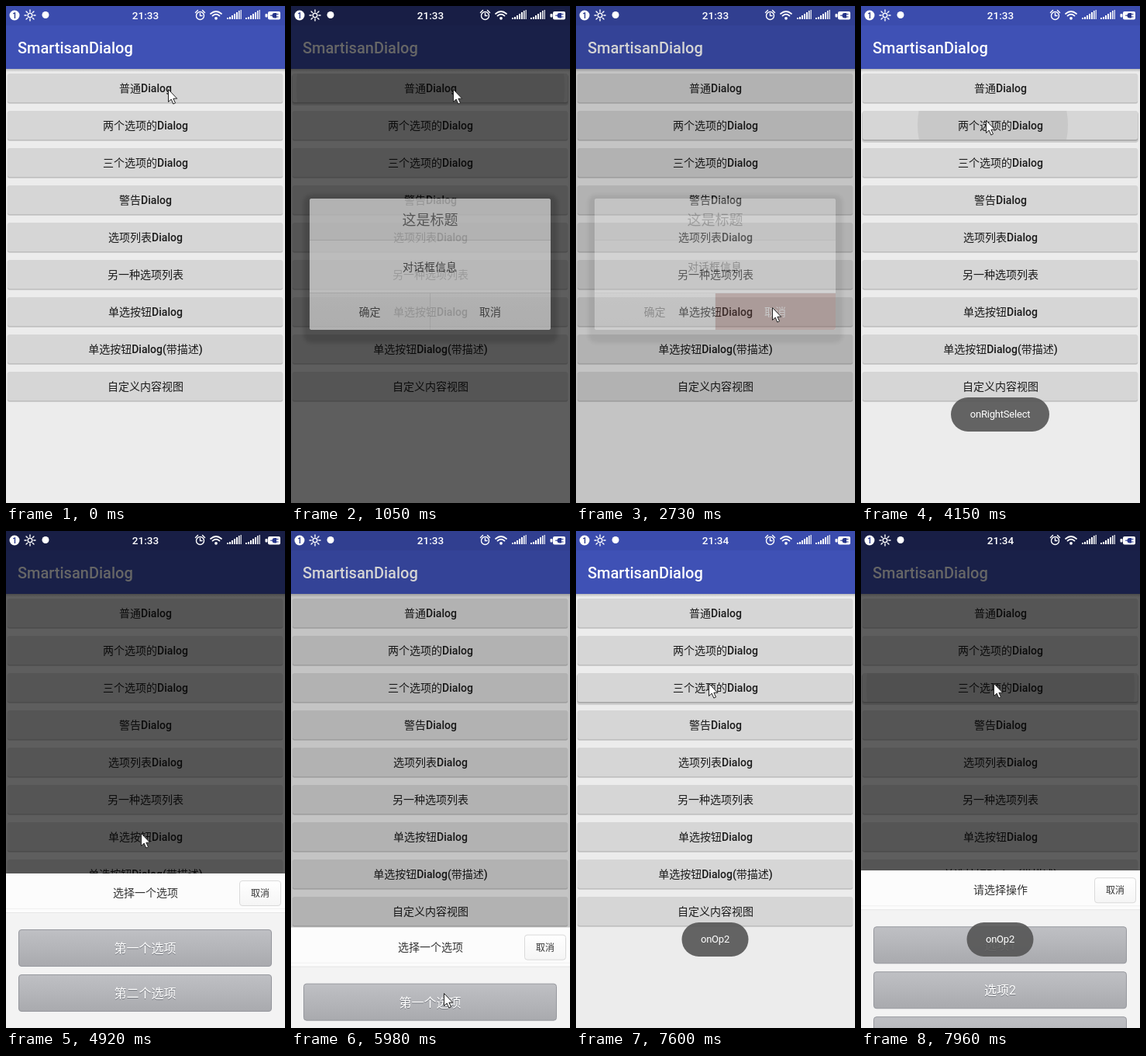
Animation, 360 px wide and 640 px high, one loop 8000 ms. Source, as an HTML page:

```html
<!DOCTYPE html>
<html lang="zh-CN">
<head>
<meta charset="utf-8">
<title>SmartisanDialog</title>
<style>
html, body { margin: 0; width: 100%; height: 100%; overflow: hidden; background: #ececec; }
svg { display: block; width: 360px; height: 640px; }
text { font-family: Roboto, "Noto Sans CJK SC", "Noto Sans CJK", sans-serif; text-anchor: middle; }
.m { font-weight: 500; }
</style>
</head>
<body>
<svg id="stage" viewBox="0 0 360 640" xmlns="http://www.w3.org/2000/svg"></svg>
<script>
const LOOP = 8000;
const labels = ['普通Dialog', '两个选项的Dialog', '三个选项的Dialog', '警告Dialog', '选项列表Dialog',
  '另一种选项列表', '单选按钮Dialog', '单选按钮Dialog(带描述)', '自定义内容视图'];

// Screen refreshes: [start, end, count]
const refresh = [[0, 0, 1], [500, 500, 1], [930, 1170, 3], [1540, 2190, 12], [2550, 2550, 1],
  [2730, 3490, 14], [3910, 3970, 2], [4150, 4150, 1], [4270, 4920, 9], [4970, 5450, 8],
  [5800, 5800, 1], [5980, 6220, 5], [6520, 7170, 12], [7600, 7600, 1], [7840, 7960, 2]];

// Pointer path: [time, x, y]
const path = [[0, 209, 107], [1480, 209, 107], [1700, 200, 235], [1894, 227, 362], [2190, 253, 388],
  [2930, 253, 388], [3220, 195, 255], [3490, 161, 147], [4380, 161, 147], [4920, 174, 389],
  [5450, 197, 595], [6470, 197, 595], [6756, 225, 330], [7170, 171, 196], [LOOP, 171, 196]];

// press: finger down on the list button, open: released, close: dialog dismissed
const dialogs = [
  { id: 'alert', press: 500, open: 930, close: 2730 },
  { id: 'sheet2', press: 3910, open: 4150, close: 5980, height: 199 },
  { id: 'sheet3', press: 7600, open: 7840, close: Infinity, height: 257 }
];

const clamp = v => Math.max(0, Math.min(1, v));
const rect = (x, y, w, h, fill, more = '') =>
  `<rect x="${x}" y="${y}" width="${w}" height="${h}" fill="${fill}" ${more}/>`;
const label = (s, x, y, size, fill, more = '') =>
  `<text x="${x}" y="${y}" font-size="${size}" fill="${fill}" ${more}>${s}</text>`;
const grad = (id, a, b) =>
  `<linearGradient id="${id}" x2="0" y2="1"><stop stop-color="${a}"/><stop offset="1" stop-color="${b}"/></linearGradient>`;

function listButton(s, i) {
  const y = 87 + i * 48;
  const mixed = s.replace(/[\x20-\x7e]+/g, '<tspan class="m">$&</tspan>');
  return rect(1.5, y + .5, 356, 38.5, '#000', 'rx="3" opacity=".07"') +
    rect(2, y + 1, 355, 37.5, '#000', 'rx="2.5" opacity=".13"') +
    (i < 3 ? rect(1, y + 1, 357, 40, '#000', `id="lift${i}" rx="4" opacity="0"`) : '') +
    rect(2, y, 355, 37, '#d6d6d6', 'rx="2.5"') +
    (i < 3 ? `<clipPath id="clip${i}">${rect(2, y, 355, 37, '#000', 'rx="2.5"')}</clipPath>
      <circle id="ripple${i}" cy="${y + 18}" r="0" opacity=".065" clip-path="url(#clip${i})"/>` : '') +
    label(mixed, 180, y + 23.5, 14, '#1a1a1a');
}

function alertBox() {
  return `<g id="alert">
    ${rect(16, 243, 328, 191, '#000', 'rx="10" opacity=".25" filter="url(#soft)"')}
    ${rect(24, 248, 311, 169, '#fbfbfb', 'rx="3"')}
    <path d="M24 301V251q0-3 3-3H332q3 0 3 3V301Z" fill="#f0f0f0"/>
    <path d="M24 370H335V414q0 3-3 3H27q-3 0-3-3Z" fill="url(#foot)"/>
    <path id="chosen" d="M180 370H335V414q0 3-3 3H180Z" fill="#9b625c"/>
    <path d="M24 301.5H335M24 369.5H335M179.5 370V417" stroke="#d6d6d6"/>
    ${label('这是标题', 179.5, 281.5, 18, '#555', 'class="m"')}
    ${label('对话框信息', 179, 341, 14, '#333')}
    ${label('确定', 101.5, 399, 14, '#333')}
    ${label('取消', 257, 399, 14, '#333', 'id="cancel"')}
  </g>`;
}

function sheet(id, height, title, options) {
  const items = options.map((s, i) => {
    const y = 72.5 + i * 58;
    return rect(16.5, y, 326, 47, 'url(#grey)', `id="${id}o${i}" rx="3.5" stroke="#96989e"`) +
      label(s, 179.5, y + 30.5, 16, '#777a80') + label(s, 179.5, y + 29.5, 16, '#fff');
  }).join('');
  return `<g id="${id}">
    ${rect(0, 0, 360, height, '#f3f3f3')}
    ${rect(0, 0, 360, 50, '#fcfcfc')}
    ${rect(0, 45, 360, 1, '#f0f0f0')}${rect(0, 50, 360, 1, '#e6e6e6')}
    ${label(title, 180, 30, 14, '#333')}
    ${rect(301.5, 9.5, 53, 32, 'url(#pale)', 'rx="3.5" stroke="#dadada"')}
    ${label('取消', 328, 30, 12, '#333')}
    ${items}
  </g>`;
}

function toast(id, s, width) {
  return `<g id="${id}">${rect(179.5 - width / 2, 504, width, 44, '#555', 'rx="22" opacity=".9"')}
    ${label(s, 179.5, 530, 13, '#fff', 'letter-spacing="-.2"')}</g>`;
}

function bars(x) {
  return [2, 3, 5, 7, 9].map((h, i) => rect(x + i * 3, 17 - h, 2, h, '#fff')).join('') +
    rect(x + 15, 6, 1.5, 11, '#fff') + rect(x + 17.5, 5, 1.5, 12, '#fff', 'opacity=".75"');
}

function statusIcons() {
  const rays = [...Array(8).keys()].map(i =>
    `<path d="M31 7.2V5" transform="rotate(${i * 45} 31 12)"/>`).join('');
  return `<circle cx="11" cy="12" r="6.5" fill="#fff"/>
    ${label('1', 11, 15.5, 10, '#2c3b90', 'font-weight="700"')}
    <g fill="none" stroke="#fff" stroke-width="1.4" stroke-linecap="round">
      <circle cx="31" cy="12" r="2.8"/>${rays}
      <circle cx="250.500" cy="12.500" r="5"/>
      <path d="M250.500 9.500V12.500H253M244.500 8.500l3-3M256.500 8.500l-3-3"/>
      <path d="M264 10q7-6 14 0M266.500 12.700q4.500-4 9 0" stroke-width="1.700"/>
    </g>
    <circle cx="51" cy="11.500" r="4.500" fill="#fff"/>
    <circle cx="271" cy="15.800" r="1.900" fill="#fff"/>
    ${label('', 180, 17, 13.5, '#fff', 'id="clock" class="m"')}
    ${bars(285)}${bars(309)}
    ${rect(338, 7, 16, 10.5, '#fff', 'rx="2"')}${rect(334.5, 10, 3, 4.5, '#fff', 'rx="1"')}
    <path d="M341 12.200h3M349 10.500h2.500M349 14h2.500" stroke="#27358a"/>
    <path d="M349 9v6.500h-2.500q-3 0-3-3.200t3-3.300Z" fill="#27358a"/>`;
}

const stage = document.getElementById('stage');
stage.innerHTML = `<defs>
    ${grad('grey', '#bfc0c4', '#a9aaae')}${grad('down', '#96979b', '#85868a')}
    ${grad('pale', '#fff', '#f5f5f5')}${grad('foot', '#efefef', '#e9e9e9')}
    ${grad('drop', '#bbb', '#ececec')}
    <filter id="soft"><feGaussianBlur stdDeviation="2.5"/></filter>
  </defs>
  ${rect(0, 0, 360, 640, '#ececec')}
  ${rect(0, 81, 360, 4, 'url(#drop)')}
  ${rect(0, 0, 360, 81, '#3f51b5')}${rect(0, 0, 360, 25, '#3b4cad')}
  ${label('SmartisanDialog', 15, 61, 20, '#fff', 'class="m" style="text-anchor:start"')}
  ${labels.map(listButton).join('')}
  ${rect(0, 0, 360, 640, '#000', 'id="dim"')}
  ${alertBox()}
  ${sheet('sheet2', 199, '选择一个选项', ['第一个选项', '第二个选项'])}
  ${sheet('sheet3', 257, '请选择操作', ['选项1', '选项2', '选项3'])}
  ${toast('toast0', 'onRightSelect', 127)}${toast('toast1', 'onOp2', 86)}
  ${statusIcons()}
  <path id="pointer" d="M.5 .5V16.500l3.700-3.400 2.600 6 2.700-1.200-2.600-5.700h4.800Z" fill="#fff" stroke="#222"/>`;

const el = {};
stage.querySelectorAll('[id]').forEach(e => el[e.id] = e);
const set = (id, name, value) => el[id].setAttribute(name, value);

// Latest refresh at or before t
function snap(t) {
  const [a, b, n] = refresh.findLast(r => r[0] <= t);
  const gap = (b - a) / (n - 1) || 1;
  return Math.min(b, a + Math.floor((t - a) / gap + 1e-6) * gap);
}

// Hermite curve through the path, at rest wherever the pointer pauses
function pointerAt(t) {
  const i = Math.max(1, path.findIndex(p => p[0] >= t));
  const a = path[i - 1], b = path[i], dt = b[0] - a[0], u = (t - a[0]) / dt;
  const still = (p, q) => !p || !q || (p[1] === q[1] && p[2] === q[2]);
  const slope = (j, c) => {
    const p = path[j - 1], q = path[j + 1];
    return still(p, path[j]) || still(path[j], q) ? 0 : (q[c] - p[c]) / (q[0] - p[0]);
  };
  return [1, 2].map(c => {
    const s = u * u * (3 - 2 * u);
    return a[c] + (b[c] - a[c]) * s +
      dt * u * (1 - u) * (slope(i - 1, c) * (1 - u) - slope(i, c) * u);
  });
}

function draw(time) {
  const t = snap(time);
  let dim = 0;
  dialogs.forEach(({ id, press, open, close, height }, i) => {
    const since = t - open, gone = t - close;
    const shade = gone < 0 ? clamp(since / 120) : Math.max(0, .283 - gone / 200);
    dim = Math.max(dim, shade);

    const grow = clamp(since / 120);
    set('lift' + i, 'opacity', t >= press && since < 180 ? .12 : 0);
    set('ripple' + i, 'r', since >= 0 && since < 180 ? 97 + 76 * grow : 0);
    set('ripple' + i, 'cx', 170 + 10 * grow);

    if (height) {
      const hidden = gone < 0 ? (1 - clamp(since / 222)) ** 2 : clamp(.35 + gone / 90);
      set(id, 'transform', `translate(0 ${640 - height * (1 - hidden)})`);
    } else {
      set(id, 'opacity', gone < 0 ? clamp(since / 200) : shade);
    }
  });
  set('dim', 'opacity', dim * .6);

  const chosen = t >= 2550;
  set('chosen', 'opacity', +chosen);
  set('cancel', 'fill', chosen ? '#fff' : '#333');
  set('sheet2o1', 'fill', t >= 5800 ? 'url(#down)' : 'url(#grey)');

  set('toast0', 'opacity', Math.min(clamp((t - 2770) / 200), clamp((4900 - t) / 200)));
  set('toast1', 'opacity', clamp((t - 6020) / 200));
  el.clock.textContent = t < 7000 ? '21:33' : '21:34';
  set('pointer', 'transform', `translate(${pointerAt(t).map(v => v.toFixed(1))})`);
}

function tick() {
  draw(performance.now() % LOOP);
  requestAnimationFrame(tick);
}
tick();
</script>
</body>
</html>
```
